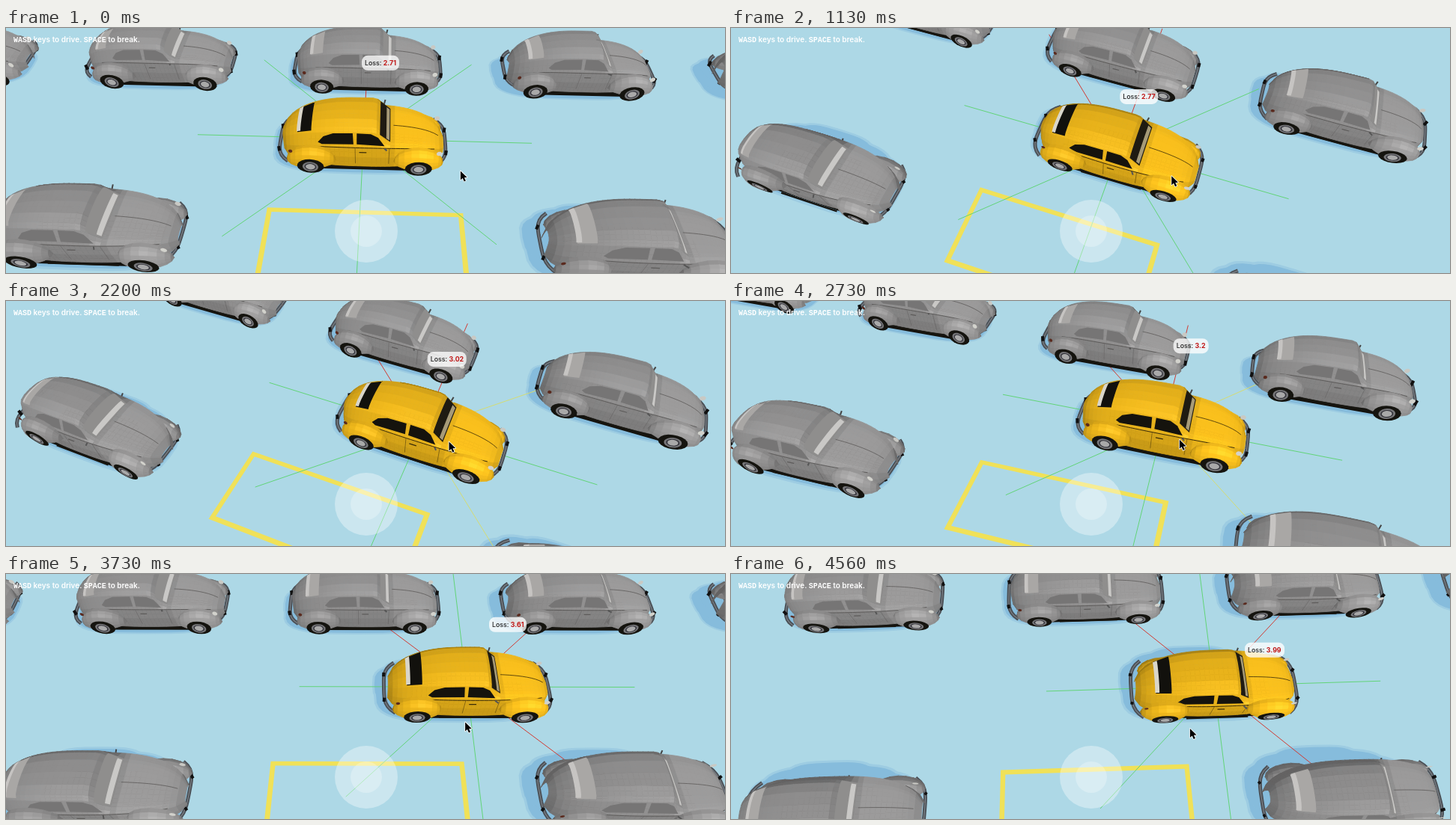
Write an HTML page with a canvas that moves like this. It is 960 by 328 pixels and loops after 4660 ms.

```html
<!DOCTYPE html>
<html lang="en">
<head>
<meta charset="utf-8">
<title>Parking</title>
<style>
  html, body { margin: 0; width: 100%; height: 100%; overflow: hidden; background: #add8e6; }
  canvas { display: block; }
  div { position: absolute; white-space: pre; }
  #hint { left: 10px; top: 9px; color: #fff; font: 600 10px/13px Inter, sans-serif; }
  #hint code { font: 700 10px/13px "Liberation Mono", monospace; }
  #loss { left: 0; top: 0; padding: 0 4px; border-radius: 8px; background: rgba(255, 255, 255, .78);
    color: #222; font: 500 8.8px/20px Inter, sans-serif; }
  #loss b { color: #c01818; font-weight: 700; }
</style>
</head>
<body>
<canvas id="stage" width="960" height="328"></canvas>
<div id="hint"><code>WASD</code> keys to drive. <code>SPACE</code> to break.</div>
<div id="loss">Loss: <b></b></div>
<script>
const ctx = document.getElementById('stage').getContext('2d');
const label = document.getElementById('loss'), value = label.querySelector('b');
const LOOP = 4660, STEP = 200 / 3, LAST = 68, DIST = 740, LENGTH = 104, TAU = 2 * Math.PI;

// Orbit drag: step, yaw, pitch
const ORBIT = [[0, 2, 49], [11, 10.3, 60], [24, 25.7, 57.5], [41, 15.2, 46.9],
  [49, 6.4, 49.5], [62, -3.8, 62.5], [68, -1.9, 68]];

function spline(rows, t) {
  const end = rows.length - 1;
  let i = rows.findIndex(r => r[0] >= t);
  i = i < 0 ? end : Math.max(i, 1);
  const a = rows[i - 1], b = rows[i], d = b[0] - a[0], u = (t - a[0]) / d;
  const slope = (j, c) => {
    const p = rows[Math.max(j - 1, 0)], q = rows[Math.min(j + 1, end)];
    return (q[c] - p[c]) / (q[0] - p[0]) * d;
  };
  return a.map((_, c) => a[c] + u * u * (3 - 2 * u) * (b[c] - a[c])
    + u * (1 - u) * (1 - u) * slope(i - 1, c) - u * u * (1 - u) * slope(i, c));
}

const range = (n, f) => Array.from({ length: n + 1 }, (_, i) => f(i / n));
const lerp = (a, b, t) => a + (b - a) * t;
const smooth = t => (t = Math.min(1, Math.max(0, t)), t * t * (3 - 2 * t));

// Point on the body shell: v runs from the near sill (0) over the roof (6) to the far sill (12)
function hull(x, v) {
  const s = Math.abs(x / LENGTH), tail = Math.max(0, -x - 12) / 95;
  const w = 39 * (1 - s ** 2.5) ** .35, belt = 16 + 33 * Math.sqrt(1 - s ** 3);
  const rise = 2 + 26 * smooth((37 - x) / 24) * (1 - .42 * tail * tail);
  const u = v <= 6 ? v : 12 - v, i = Math.min(Math.floor(u), 5);
  const ring = [[.95, 12], [1, .65 * belt], [.97, belt], [.77, belt + .67 * rise],
    [.65, belt + .85 * rise], [.38, belt + .97 * rise], [0, belt + rise]];
  const z = w * lerp(ring[i][0], ring[i + 1][0], u - i), y = lerp(ring[i][1], ring[i + 1][1], u - i);
  return [x, y, v <= 6 ? z : -z];
}

const fender = (cx, cz) => (u, v) => [cx + 31 * Math.sin(u), 14 + 24 * Math.cos(u) * Math.sin(v),
  cz + 15 * Math.cos(u) * Math.cos(v)];

function shade(a, b, c, d, base) {
  const p = c.map((q, i) => q - a[i]), q = d.map((r, i) => r - b[i]);
  const n = [p[1] * q[2] - p[2] * q[1], p[2] * q[0] - p[0] * q[2], p[0] * q[1] - p[1] * q[0]];
  const lit = Math.max(0, (.15 * n[0] + .81 * n[1] + .56 * n[2]) / (Math.hypot(...n) || 1));
  const gain = (.66 + .36 * lit) * (a[0] > 35 ? 1.08 : 1), gloss = 22 * lit ** 24;
  return `rgb(${base.map(k => Math.round(k * gain + gloss))})`;
}

function buildCar({ base, side, rear, rearRim, front, frontRim, trim }) {
  const shapes = [];
  const fill = (pts, color) => shapes.push({ pts, color });
  const line = (pts, color, width) => shapes.push({ pts, color, width });
  const surface = (f, u0, u1, nu, v0, v1, nv) => {
    for (let i = 0; i < nu; i++) for (let j = 0; j < nv; j++) {
      const [ua, ub] = [i, i + 1].map(k => lerp(u0, u1, k / nu));
      const [va, vb] = [j, j + 1].map(k => lerp(v0, v1, k / nv));
      const pts = [f(ua, va), f(ub, va), f(ub, vb), f(ua, vb)];
      shapes.push({ pts, color: shade(...pts, base), face: true });
    }
  };
  const disc = (x, y, z, rx, ry, color) => fill(range(20, t =>
    [x + rx * Math.cos(t * TAU), y + ry * Math.sin(t * TAU), z]), color);
  const patch = (x0, x1, v0, v1, color) => fill([
    ...range(8, t => hull(x0, lerp(v0, v1, t))), ...range(8, t => hull(x1, lerp(v1, v0, t)))], color);
  const onHull = list => list.map(([x, v]) => hull(x, v));
  const axles = [-66, 71];

  fill([[-75, 4, -36], [78, 4, -36], [78, 4, 36], [-75, 4, 36]], '#14130f');
  for (const dir of [-1, 1]) {
    const nose = dir * 107 - 1;
    const bar = range(16, t => [nose - dir * 14 * (2 * t - 1) ** 4, 22, 40 * (2 * t - 1)]);
    line(bar, '#4b5056', 5);
    line(bar, '#7b8086', 1.2);
    for (const z of [-20, 20]) line([[nose, 18, z], [nose, 27, z]], '#111', 4);
  }
  for (const x of axles) surface(fender(x, -29), -1.57, 1.57, 10, 0, 3.14, 8);
  disc(96, 34, -30, 3.5, 4, '#c9c9c4');
  line([[25, 54, -31], [27, 60, -36]], '#444', 2);
  surface(hull, -103, 103, 36, 0, 12, 24);

  patch(-81, -63, 3.4, 8.6, rear);
  patch(-82, -77, 3.6, 8.4, rearRim);
  patch(21, 34, 3.1, 8.9, front);
  patch(29, 33, 3.5, 8.5, frontRim);
  fill(onHull([[-55, 2.3], [-48, 2.7], [-36, 2.9], [-12, 2.92], [-11, 2.2], [-50, 2.15]]), side);
  fill(onHull([[-7, 2.2], [-7, 2.92], [10, 2.9], [19, 2.75], [27, 2.2]]), side);
  line(range(30, t => hull(lerp(-74, 90, t), 1.95)), trim, 1);
  line(range(10, t => hull(lerp(38, 96, t), 6)), trim, .8);
  for (const x of [-9, 33]) line([hull(x, .3), hull(x, 1.9)], trim, .5);
  line([[-4, 41, 39], [5, 41, 39]], trim, 1.2);
  line([[-38, 11, 39], [42, 11, 39]], '#17150f', 2.5);

  for (const x of axles) {
    surface(fender(x, 29), -1.57, 1.57, 10, 0, 1.8, 6);
    disc(x, 14, 41, 17, 13.5, '#15140f');
    disc(x, 14, 42, 10, 9.5, '#77777a');
    disc(x, 14, 42, 7.5, 7, '#33333a');
    disc(x, 14, 42, 6, 5.5, '#a9a9a9');
  }
  disc(96, 33, 31, 3.5, 4, '#d2d2cc');
  disc(-91, 32, 32, 2.5, 3, '#5a2a1e');
  line([[27, 48, 38], [30, 50, 43]], '#555', 2);
  return shapes;
}

const yellowCar = buildCar({ base: [242, 186, 28], side: '#15130d', rear: '#12110d', rearRim: '#d9d6ca',
  front: '#1f1b12', frontRim: '#a79b78', trim: '#3a2c08' });
const grayCar = buildCar({ base: [151, 150, 150], side: '#767575', rear: '#a9a7a5', rearRim: '#c6c4c2',
  front: '#8f8e8d', frontRim: '#c9c8c6', trim: '#5d5b5a' });

const parked = [];
for (let slot = -2; slot <= 2; slot++) {
  parked.push({ x: slot * 307 - 1, z: -149, shapes: grayCar });
  if (slot) parked.push({ x: slot * 309, z: 149, shapes: grayCar });
}

let sinYaw, cosYaw, sinPitch, cosPitch;
function aim(yaw, pitch) {
  [sinYaw, cosYaw, sinPitch, cosPitch] = [yaw, pitch].flatMap(a => [Math.sin(a * TAU / 360), Math.cos(a * TAU / 360)]);
}

function project(x, y, z) {
  const px = x * cosYaw - z * sinYaw, pz = x * sinYaw + z * cosYaw;
  const k = DIST / (DIST - pz * cosPitch - y * sinPitch);
  return [480 + k * px, 164 + k * (pz * sinPitch - y * cosPitch)];
}

function trace(points) {
  points.forEach(([x, y], i) => i ? ctx.lineTo(x, y) : ctx.moveTo(x, y));
}

function drawCar({ x, z, shapes }) {
  const [sx, sy] = project(x, 0, z);
  if (sx < -190 || sx > 1150 || sy < -130 || sy > 480) return;
  for (const { pts, color, width, face } of shapes) {
    const p = pts.map(q => project(x + q[0], q[1], z + q[2]));
    if (face) {
      const area = (p[2][0] - p[0][0]) * (p[3][1] - p[1][1]) - (p[2][1] - p[0][1]) * (p[3][0] - p[1][0]);
      if (area >= 0) continue;
    }
    ctx.beginPath();
    trace(p);
    ctx.strokeStyle = ctx.fillStyle = color;
    ctx.lineWidth = width || .8;
    if (!width) { ctx.closePath(); ctx.fill(); }
    if (width || face) ctx.stroke();
  }
}

// Body slices cast on the ground, away from the light
function drawShadow({ x, z }, grow, color) {
  const bend = v => Math.sign(v) * Math.abs(v) ** .6;
  ctx.fillStyle = color;
  for (const lift of [0, .4, .75, 1]) {
    const rx = 106 - 50 * lift ** 3 + grow, rz = 42 - 15 * lift + grow;
    ctx.beginPath();
    trace(range(36, t => project(x - 11 - 13 * lift + rx * bend(Math.cos(t * TAU)), 0,
      z - 5 - 36 * lift + rz * bend(Math.sin(t * TAU)))));
    ctx.fill();
  }
}

function drawSpot() {
  ctx.beginPath();
  for (const inset of [0, 6]) {
    const l = inset - 117, r = 122 - inset, t = 97 + inset, b = 202 - inset;
    trace([project(l, 0, t), project(r, 0, t), project(r, 0, b), project(l, 0, b)]);
    ctx.closePath();
  }
  ctx.fillStyle = '#f0e158';
  ctx.fill('evenodd');
}

// Eight distance sensors, coloured by how close the next parked car is
function drawRays(x) {
  const green = '#62d478', red = '#d23a32', yellow = '#d5dc72';
  const right = x > 105 ? red : x > 44 ? yellow : green;
  const colors = [green, right, green, green, green, x > 5 ? red : green, x < 105 ? red : green, right];
  ctx.lineWidth = 1;
  colors.forEach((color, i) => {
    const a = i * TAU / 8;
    ctx.beginPath();
    trace([project(x, 23, 0), project(x + 218 * Math.cos(a), 23, 218 * Math.sin(a))]);
    ctx.strokeStyle = color;
    ctx.stroke();
  });
}

function drawCircle(r, alpha) {
  ctx.beginPath();
  ctx.arc(481, 272, r, 0, TAU);
  ctx.fillStyle = `rgba(255,255,255,${alpha})`;
  ctx.fill();
}

function drawCursor(x, y) {
  ctx.beginPath();
  trace([[0, 0], [0, 12], [2.8, 9.5], [4.8, 14], [7, 13], [5, 8.8], [8.7, 8.5]].map(([a, b]) => [x + a, y + b]));
  ctx.closePath();
  ctx.lineWidth = 1.6;
  ctx.strokeStyle = '#fff';
  ctx.fillStyle = '#000';
  ctx.stroke();
  ctx.fill();
}

function render(step) {
  const [, yaw, pitch] = spline(ORBIT, step);
  const x = 2.4 * step - 2.5;
  aim(yaw, pitch);

  ctx.fillStyle = '#add8e6';
  ctx.fillRect(0, 0, 960, 328);
  ctx.lineJoin = 'round';
  const depth = c => c.x * sinYaw + c.z * cosYaw;
  const cars = [...parked, { x, z: 0, shapes: yellowCar }].sort((a, b) => depth(a) - depth(b));
  drawSpot();
  for (const car of cars) drawShadow(car, 4, '#9dcce2');
  for (const car of cars) drawShadow(car, 1, '#86bcdc');
  drawRays(x);
  cars.forEach(drawCar);
  drawCircle(42, .36);
  drawCircle(21, .26);

  // The dragging pointer runs a little ahead of the damped camera
  const [, dragX, dragY] = spline(ORBIT, Math.min(LAST, step + 3));
  drawCursor(611 - dragX, 139 + dragY);

  const [labelX, labelY] = project(x - 1, 174, 15);
  value.textContent = +Math.sqrt(7.33 + .000365 * (x - 7) ** 2).toFixed(2);
  label.style.transform = `translate(${labelX}px, ${labelY}px)`;
}

let shown = -1;
function tick(now) {
  const step = Math.min(LAST, Math.floor((now % LOOP + 4) / STEP));
  if (step !== shown) render(shown = step);
  requestAnimationFrame(tick);
}
tick(0);
</script>
</body>
</html>
```
